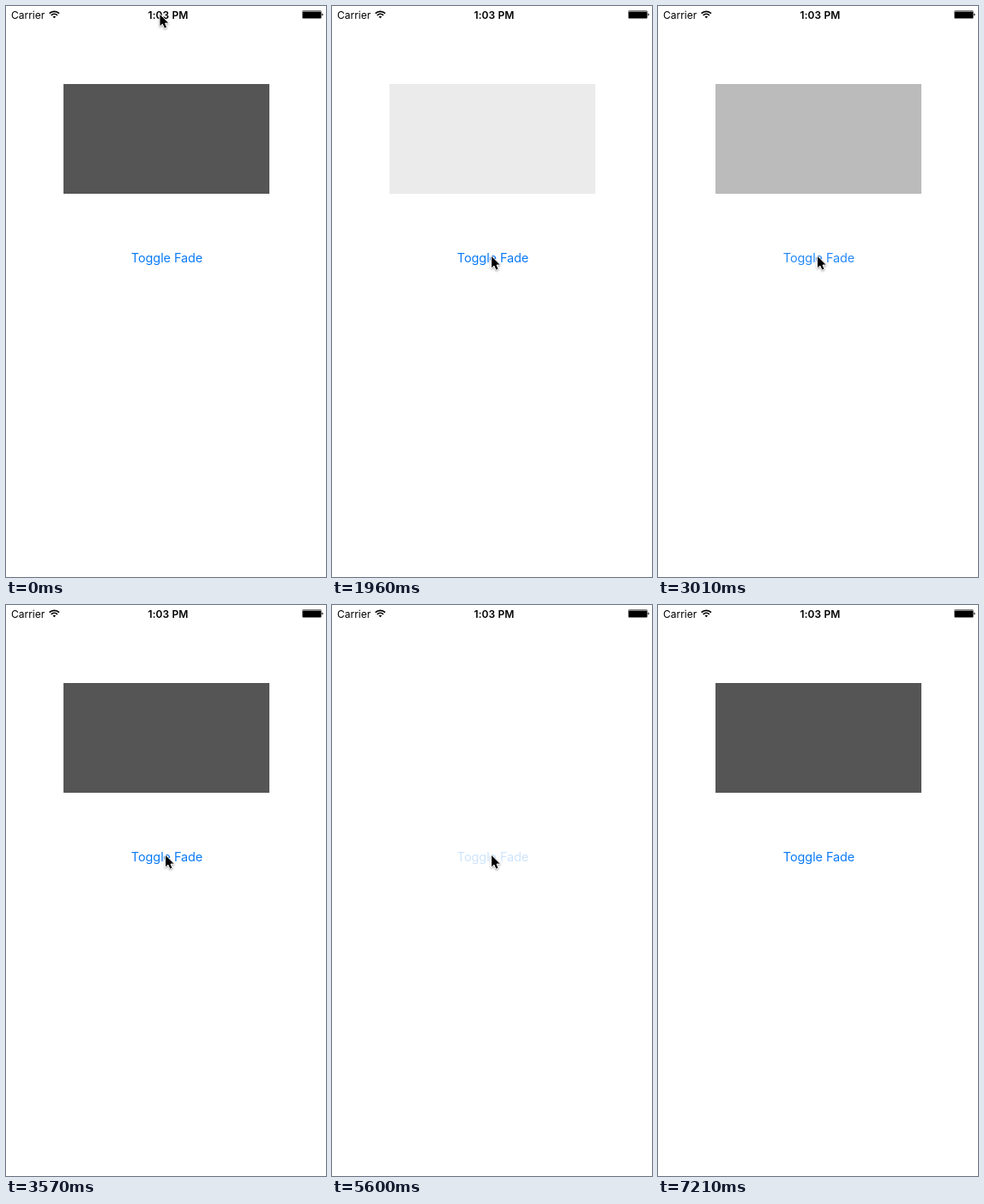
An HTML page that plays this animation: 373 px wide and 666 px high, repeating every 7.49 s.

```html
<!DOCTYPE html>
<html lang="en">
<head>
<meta charset="utf-8">
<title>Toggle Fade</title>
<style>
  html, body { margin: 0; width: 100%; height: 100%; overflow: hidden; background: #fff; }
  svg { display: block; }
  text { font-family: Inter, Roboto, "Liberation Sans", sans-serif; }
  #cursor { filter: drop-shadow(0 1px 1px rgba(0, 0, 0, .35)); }
</style>
</head>
<body>
<svg width="373" height="666" viewBox="0 0 373 666">
  <text x="6" y="14.5" font-size="12">Carrier</text>
  <g fill="none" stroke="#000" stroke-width="1.7">
    <path d="M50.6 8.7a8.2 8.2 0 0 1 11.4 0"/>
    <path d="M52.7 10.9a5.2 5.2 0 0 1 7.2 0"/>
    <path d="M56.3 14.2L54.5 12.5a2.6 2.6 0 0 1 3.6 0Z" fill="#000" stroke="none"/>
  </g>
  <text x="189" y="14.5" font-size="12" font-weight="600" text-anchor="middle" letter-spacing=".1">1:03 PM</text>
  <rect x="345.5" y="5.5" width="22" height="9" rx="1" fill="none" stroke="#000" stroke-opacity=".5"/>
  <rect x="346" y="6.5" width="21" height="7.5" rx=".5"/>
  <path d="M368.3 8.5q1.3 .3 1.3 1.5t-1.3 1.5Z"/>

  <rect id="panel" x="67" y="91" width="240" height="128" fill="#555"/>
  <text id="label" x="187.5" y="298.5" font-size="14.5" text-anchor="middle" letter-spacing="-.1" fill="#0a7af7">Toggle Fade</text>
  <path id="cursor" d="M0 0V15.2L3.4 12.1L5.6 17.2L8.6 15.9L6.5 11.1H11Z" stroke="#fff"/>
</svg>
<script>
const LOOP = 7490, STEP = 70;
const FADE = 900, GLOW = 480, LAG = 90, DIM = .2;

// The button dims on press; the panel fade becomes visible LAG after start
const taps = [
  { press: 1190, start: 1166 },
  { press: 2660, start: 2655 },
  { press: 4200, start: 4213 },
  { press: 5600, start: 5685 }
];

// Cursor tip follows one curve in and another out
const enter = { from: 0, to: 560, ease: easeInOut, points: [[179, 9], [163, 80], [209, 230], [185.5, 291]] };
const leave = { from: 6790, to: 7210, ease: easeIn, points: [[185.5, 291], [195, 200], [192, 80], [181, -40]] };

const [panel, label, cursor] = ["panel", "label", "cursor"].map(id => document.getElementById(id));
const clamp = u => Math.min(1, Math.max(0, u));

function easeInOut(u) { return u * u * (3 - 2 * u); }
function easeIn(u) { return u ** 1.5; }

function bezier([a, b, c, d], u) {
  const v = 1 - u;
  return [0, 1].map(k => v ** 3 * a[k] + 3 * v * v * u * b[k] + 3 * v * u * u * c[k] + u ** 3 * d[k]);
}

function tipAt(t) {
  const { from, to, ease, points } = t < leave.from ? enter : leave;
  return bezier(points, ease(clamp((t - from) / (to - from))));
}

function draw(now) {
  const t = Math.floor(now % LOOP / STEP) * STEP;
  cursor.setAttribute("transform", `translate(${tipAt(t)})`);

  let shown = 1, bright = 1;
  taps.forEach(({ press, start }, i) => {
    if (t < press) return;
    const since = t - start;
    const age = since < LAG ? 0 : since;
    const p = clamp(age / FADE);
    shown = i % 2 ? p : 1 - p;
    bright = 1 - (1 - DIM) * (1 - clamp(age / GLOW)) ** 1.5;
  });
  panel.setAttribute("opacity", shown);
  label.setAttribute("opacity", bright);
}

const start = performance.now();
function tick() {
  draw(performance.now() - start);
  requestAnimationFrame(tick);
}
tick();
</script>
</body>
</html>
```
